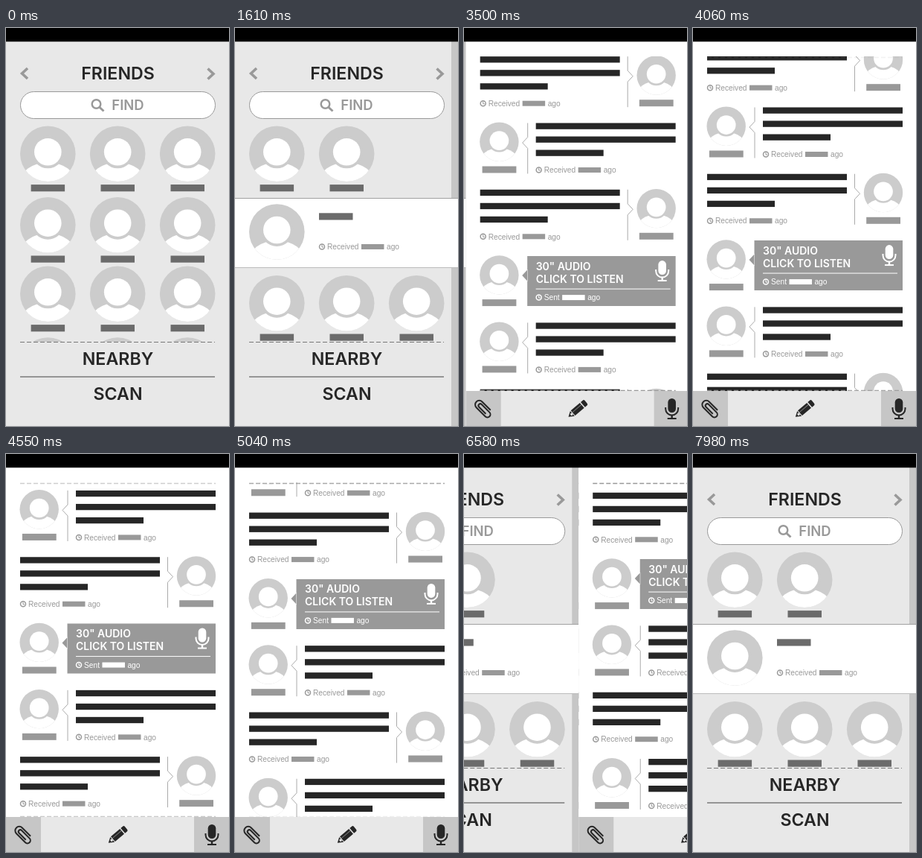
These frames come from a looping animation (300x534 px, 8 s). An HTML page with a canvas:

```html
<!DOCTYPE html>
<html lang="en">
<head>
<meta charset="utf-8">
<title>Friends and messages</title>
<style>
html, body { margin: 0; width: 100%; height: 100%; overflow: hidden; background: #000; }
canvas { display: block; width: 300px; height: 534px; }
</style>
</head>
<body>
<canvas id="stage"></canvas>
<script>
const W = 300, H = 534, LOOP = 8000, STEP = 70;
const GREY = '#999', PALE = '#ccc', DARK = '#262626', PAGE = '#e8e8e8', EDGE = '#c6c6c6';
const canvas = document.getElementById('stage');
const c = canvas.getContext('2d');
const scale = window.devicePixelRatio || 1;
canvas.width = W * scale;
canvas.height = H * scale;

// Smooth progress from 0 to 1 between two times
function ease(t, from, to) {
  const u = Math.min(1, Math.max(0, (t - from) / (to - from)));
  return u * u * (3 - 2 * u);
}
const mix = (a, b, p) => a + (b - a) * p;

function rect(x, y, w, h, color) {
  c.fillStyle = color;
  c.fillRect(x, y, w, h);
}
function ellipse(x, y, rx, ry, color) {
  c.fillStyle = color;
  c.beginPath();
  c.ellipse(x, y, rx, ry, 0, 0, 7);
  c.fill();
}
function line(points, color, width = 1, dash = []) {
  c.strokeStyle = color;
  c.lineWidth = width;
  c.setLineDash(dash);
  c.beginPath();
  points.forEach(([x, y]) => c.lineTo(x, y));
  c.stroke();
  c.setLineDash([]);
}
function text(str, x, y, size, color, align = 'center') {
  c.font = `600 ${size}px Inter, sans-serif`;
  c.textAlign = align;
  c.fillStyle = color;
  c.fillText(str, x, y);
}
// Draws inside a saved state, optionally clipped to a vertical band
function scoped(draw, top, bottom) {
  c.save();
  if (bottom) {
    c.beginPath();
    c.rect(0, top, W, bottom - top);
    c.clip();
  }
  draw();
  c.restore();
}
function faded(alpha, draw) {
  scoped(() => { c.globalAlpha *= alpha; draw(); });
}

function avatar(x, y, r) {
  scoped(() => {
    c.translate(x, y);
    c.scale(r / 37, r / 37);
    c.beginPath();
    c.arc(0, 0, 37.3, 0, 7);
    c.clip();
    rect(-38, -38, 76, 76, PALE);
    ellipse(0, 39.5, 38, 28, '#fff');
    ellipse(0, -2.5, 22, 22, PALE);
    ellipse(0, -2.5, 18.3, 18.3, '#fff');
  });
}

// Clock, word, covered time and "ago"; y is the middle of the row
function meta(x, y, word, color) {
  c.strokeStyle = color;
  c.lineWidth = 1.5;
  c.beginPath();
  c.arc(x + 4, y, 3.5, 0, 7);
  c.stroke();
  line([[x + 4, y - 2.5], [x + 4, y + .5], [x + 6, y + .5]], color);
  c.font = '10.2px "Liberation Sans", Arial, sans-serif';
  c.textAlign = 'left';
  c.fillStyle = color;
  c.fillText(word, x + 11, y + 3.7);
  const end = x + 14.5 + c.measureText(word).width;
  c.fillText('ago', end + 34, y + 3.7);
  rect(end, y - 3.5, 30.5, 7, color);
}

function mic(x, y, color) {
  c.fillStyle = color;
  c.beginPath();
  c.roundRect(x - 5.3, y - 14, 10.6, 19, 5.3);
  c.fill();
  c.strokeStyle = color;
  c.lineWidth = 2;
  c.beginPath();
  c.moveTo(x - 8.5, y - 2);
  c.arc(x, y, 8.5, Math.PI, 0, true);
  c.lineTo(x + 8.5, y - 2);
  c.stroke();
  line([[x, y + 8], [x, y + 13]], color, 2.4);
  line([[x - 6, y + 13], [x + 6, y + 13]], color, 2);
}

function pencil(x, y) {
  scoped(() => {
    c.translate(x, y);
    c.rotate(-Math.PI / 4 + .08);
    rect(-8, -4.5, 16, 9, DARK);
    rect(-8, -1.7, 16, .8, '#888');
    c.fillStyle = DARK;
    c.beginPath();
    c.roundRect(9.5, -4.5, 5.5, 9, [0, 2, 2, 0]);
    c.moveTo(-9, -4.5);
    c.lineTo(-16, 0);
    c.lineTo(-9, 4.5);
    c.fill();
    ellipse(-10.5, 0, 1.6, 1.8, PAGE);
  });
}

function paperclip(x, y) {
  scoped(() => {
    c.translate(x, y);
    c.rotate(Math.PI / 4);
    c.strokeStyle = DARK;
    c.lineWidth = 2;
    c.beginPath();
    c.moveTo(8, -5.5);
    c.lineTo(-8, -5.5);
    c.arc(-8, 0, 5.5, -Math.PI / 2, Math.PI / 2, true);
    c.lineTo(9, 5.5);
    c.arc(9, 1.5, 4, Math.PI / 2, -Math.PI / 2, true);
    c.lineTo(-6, -2.5);
    c.arc(-6, 0, 2.5, -Math.PI / 2, Math.PI / 2, true);
    c.lineTo(7, 2.5);
    c.stroke();
  });
}

function friend(x, y) {
  avatar(x, y, 37);
  rect(x - 22.7, y + 41.3, 45.5, 9.2, '#6b6b6b');
}

function friendsPage(open) {
  rect(0, 18, W, H, PAGE);
  rect(W - 9 * open, 18, 9, H, EDGE);
  line([[29, 54], [21.5, 61], [29, 68]], GREY, 3.6);
  line([[271.5, 54.5], [279, 61.5], [271.5, 68.5]], GREY, 3.6);
  text('FRIENDS', 150.5, 69, 23.2, DARK);

  c.fillStyle = '#fff';
  c.strokeStyle = GREY;
  c.lineWidth = 1;
  c.beginPath();
  c.roundRect(19.5, 85.5, 262, 36, 18);
  c.fill();
  c.stroke();
  c.lineWidth = 2.5;
  c.beginPath();
  c.arc(121.5, 102, 5.8, 0, 7);
  c.stroke();
  line([[126, 106.5], [131.5, 111.5]], GREY, 3);
  text('FIND', 164, 110, 18.5, GREY);

  const cols = [56.3, 150.2, 244.2];
  scoped(() => {
    friend(cols[0], 168.8);
    friend(cols[1], 168.8);
    [264.2, 356.8, 452.5].forEach(y => cols.forEach(x => friend(x, y + 105 * open)));
    if (open > 0) {
      const h = 93 * open;
      rect(0, 228.5, W, h, '#fff');
      line([[0, 228.5], [W, 228.5]], '#a0a0a0');
      line([[0, 228.5 + h], [W, 228.5 + h]], '#bbb');
    }
    // The chosen friend leaves the grid and takes a row of its own
    avatar(mix(cols[2], cols[0], open), mix(168.8, 273.5, open), 37);
    rect(mix(221.5, 113, open), mix(210, 248.3, open), 45.5, 9.2, '#6b6b6b');
    faded(open, () => meta(113, 293.5, 'Received', GREY));
  }, 123, 421);

  line([[19, 421.5], [281, 421.5]], '#777', 1.2, [6, 3]);
  text('NEARBY', 150.5, 452, 23.2, DARK);
  line([[19, 468], [281, 468]], '#444', 1.2);
  text('SCAN', 150.5, 499, 23.2, DARK);
}

function audio(y) {
  c.fillStyle = GREY;
  c.beginPath();
  c.rect(82.5, y, 199.5, 67);
  c.moveTo(83, y + 18);
  c.lineTo(75.5, y + 26);
  c.lineTo(83, y + 34);
  c.fill();
  text('30" AUDIO', 94, y + 18.5, 14, '#fff', 'left');
  text('CLICK TO LISTEN', 94, y + 35.5, 14, '#fff', 'left');
  line([[94, y + 44], [275, y + 44]], '#fff');
  meta(94, y + 55.5, 'Sent', '#fff');
  mic(264, y + 20, '#fff');
}

function message(i, y) {
  const onRight = i === 0 || i === 2 || i === 5;
  const face = onRight ? 256 : 44.7;
  avatar(face, y + 25.3, 26);
  rect(face - 22.8, y + 58, 45.8, 9, GREY);
  if (i === 3) return audio(y);
  const x = onRight ? 19 : 94;
  const rule = onRight ? 217.5 : 83;
  const tip = rule + (onRight ? 7 : -7);
  [188, 188, 91].forEach((w, row) => rect(x, y + row * 18, w, 8.3, DARK));
  meta(x, y + 63, 'Received', GREY);
  line([[rule, y], [rule, y + 19], [tip, y + 26.5], [rule, y + 34], [rule, y + 68]], '#aaa');
}

function messagesPage(progress) {
  rect(0, 18, W, H, '#fff');
  scoped(() => {
    for (let i = 0; i < 7; i++) message(i, 38.2 + i * 89.3 - 165 * progress);
  }, 38, 487);
  const dashes = y => line([[19, y], [282, y]], GREY, 1.3, [6, 3]);
  faded(progress, () => dashes(39.5));
  faded(1 - progress, () => dashes(486.5));
  rect(0, 487, W, 47, PAGE);
  rect(0, 487, 47, 47, EDGE);
  rect(253, 487, 47, 47, EDGE);
  paperclip(23.5, 511);
  pencil(150, 511.5);
  mic(277, 511, DARK);
}

function draw(now) {
  const t = Math.floor(now % LOOP / STEP) * STEP;
  const open = ease(t, 40, 1560);
  const slide = ease(t, 2480, 3560) - ease(t, 6040, 7100);
  const scroll = ease(t, 3640, 5520);
  c.setTransform(scale, 0, 0, scale, 0, 0);
  if (slide < 1) {
    scoped(() => {
      c.translate(-W * slide, 0);
      friendsPage(open);
    });
  }
  if (slide > 0) {
    scoped(() => {
      c.translate(W * (1 - slide), 0);
      messagesPage(scroll);
    });
  }
  rect(0, 0, W, 18.3, '#000');
}

let start;
function tick(now) {
  start ??= now;
  draw(now - start);
  requestAnimationFrame(tick);
}
draw(0);
requestAnimationFrame(tick);
</script>
</body>
</html>
```
